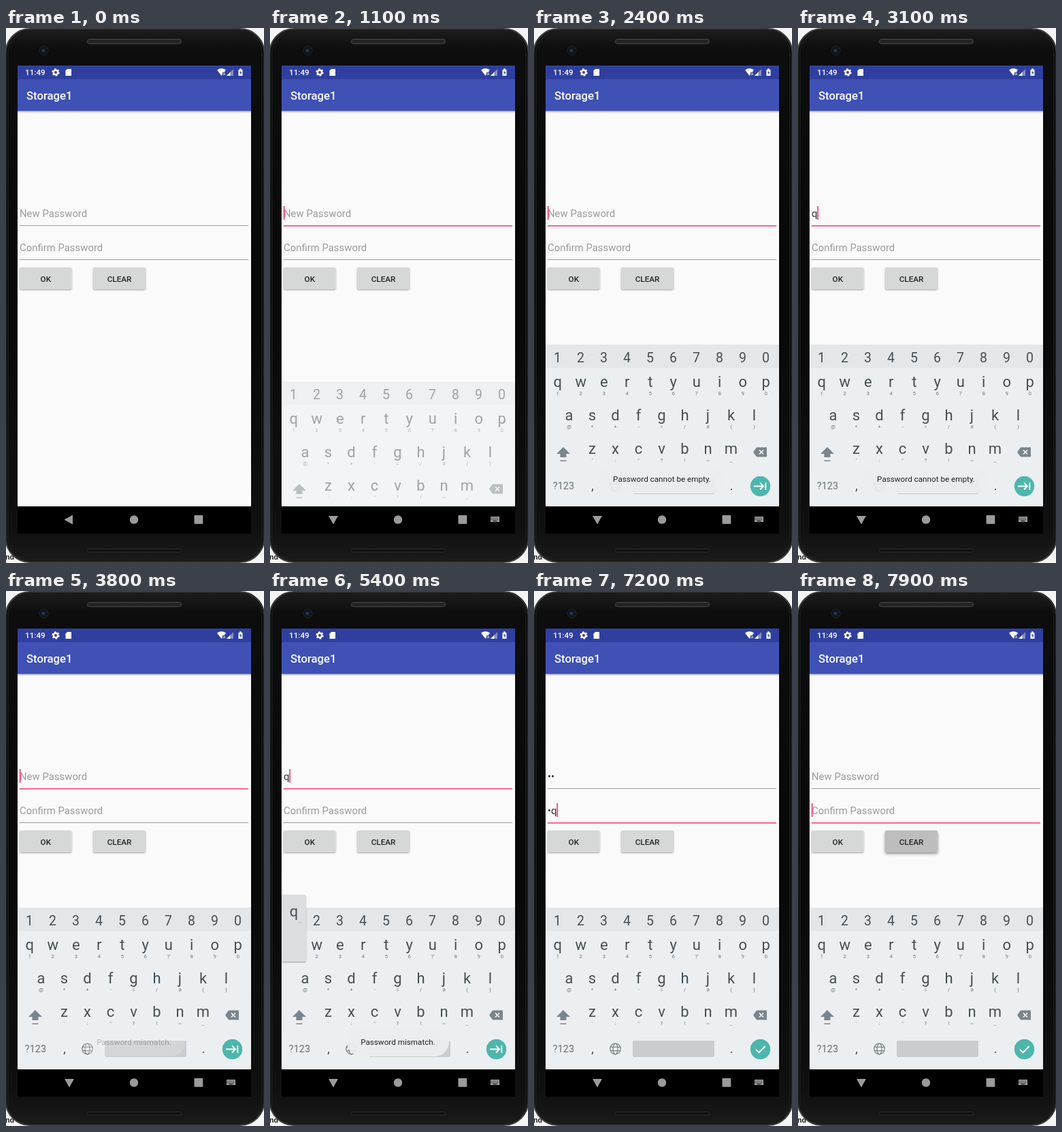
Animation of 379 by 784 pixels, one loop 8000 ms. Source, as an HTML page:

```html
<!DOCTYPE html>
<html lang="en">
<head>
<meta charset="utf-8">
<style>
  html, body { margin: 0; width: 100%; height: 100%; overflow: hidden; background: #f5f5f5; }
  svg { display: block; width: 100vw; height: 100vh; }
  text { font-family: Roboto, sans-serif; white-space: pre; }
  .mid { text-anchor: middle; }
  .medium { font-weight: 500; }
  .field { font-size: 14.9px; }
  .button { font-size: 11.7px; fill: #222; }
  .letter { font-size: 22px; fill: #455058; }
  .digit { font-size: 19.5px; fill: #455058; }
  .sub { font-size: 8px; fill: #717c82; }
  .toast { font-size: 11.7px; fill: #222; }
</style>
</head>
<body>
<svg viewBox="0 0 379 784">
  <defs>
    <linearGradient id="bezel" x2="0" y2="1">
      <stop offset="0" stop-color="#1d1d1d"/><stop offset=".04" stop-color="#0d0d0d"/>
      <stop offset=".5" stop-color="#080808"/><stop offset=".94" stop-color="#101010"/>
      <stop offset="1" stop-color="#1b1b1b"/>
    </linearGradient>
    <linearGradient id="barShadow" x2="0" y2="1">
      <stop offset="0" stop-opacity=".3"/><stop offset="1" stop-opacity="0"/>
    </linearGradient>
    <filter id="shadow" x="-20%" y="-20%" width="140%" height="150%">
      <feDropShadow dx="0" dy="1" stdDeviation="1" flood-opacity=".35"/>
    </filter>
    <filter id="lifted" x="-20%" y="-20%" width="140%" height="160%">
      <feDropShadow dx="0" dy="2" stdDeviation="2" flood-opacity=".45"/>
    </filter>
    <clipPath id="screen"><rect x="17" y="55" width="343" height="646"/></clipPath>
    <clipPath id="okClip"><rect x="20" y="351" width="76.5" height="32" rx="2"/></clipPath>
  </defs>

  <!-- phone body -->
  <text x="-1" y="779" style="font:bold 11px 'Liberation Mono',monospace" fill="#222">nd</text>
  <rect x="-.5" y="1" width="380" height="782" rx="36" fill="url(#bezel)" stroke="#3c3c3c" stroke-width="2"/>
  <rect x="3" y="5" width="373" height="774" rx="32" fill="none" stroke="#1c1c1c" stroke-width="1.5"/>
  <rect x="119.500" y="16.500" width="138" height="6.500" rx="3" fill="#242424" stroke="#4a4a4a"/>
  <rect x="119.500" y="763.500" width="138" height="4.500" rx="2" fill="#111" stroke="#2c2c2c"/>
  <circle cx="55.500" cy="33" r="6.500" fill="#11131a" stroke="#25272b"/>
  <circle cx="55" cy="33" r="2.500" fill="#263457"/>

  <!-- app -->
  <rect x="17" y="55" width="343" height="686"/>
  <rect x="17" y="55" width="343" height="646" fill="#fafafa"/>
  <rect x="17" y="121" width="343" height="4" fill="url(#barShadow)"/>
  <rect x="17" y="75" width="343" height="46.500" fill="#3f51b5"/>
  <rect x="17" y="55" width="343" height="20" fill="#303f9f"/>
  <g fill="#fff">
    <text class="medium" x="28" y="69" font-size="11.7">11:49</text>
    <circle cx="73" cy="65" r="3.200" fill="none" stroke="#fff" stroke-width="2.500"/>
    <circle cx="73" cy="65" r="4.900" fill="none" stroke="#fff" stroke-width="1.500" stroke-dasharray="2.500 2.630"/>
    <path d="M90 60h6v10h-8.500v-7.500z"/>
    <path d="M310 61.500q6.500-4.500 13 0l-2.500 3.500h-2.500v3l-1.500 2z"/>
    <path d="M319 66l3 3m0-3l-3 3" stroke="#fff"/>
    <path d="M334 60v10h-10z" opacity=".4"/><path d="M329.500 64.500v5.500h-5.500z"/>
    <path d="M341.500 61h1.500v-1.500h3V61h1.500v9h-6z"/>
    <path d="M345 62.500l-2 3.500h1.500v2.500l2-3.500H345z" fill="#303f9f"/>
    <text class="medium" x="30" y="104.500" font-size="16.700">Storage1</text>
  </g>

  <g id="fields"></g>

  <rect x="20" y="351" width="76.500" height="32" rx="2" fill="#d6d7d7" id="ok"/>
  <circle id="ripple" cx="61" cy="370" fill="#c2c2c2" clip-path="url(#okClip)"/>
  <text class="button medium mid" x="58.300" y="371.700">OK</text>
  <rect x="128" y="351" width="77" height="32" rx="2" id="clear"/>
  <text class="button medium mid" x="166.500" y="371.700">CLEAR</text>

  <!-- keyboard -->
  <g clip-path="url(#screen)">
    <g id="keyboard">
      <rect x="17" y="464" width="343" height="260" fill="#eceff1"/>
      <rect x="17" y="464" width="343" height="34" fill="#e4e7e9"/>
      <g id="keys"></g>
      <path d="M43 614l10 10h-5.500v5h-9v-5H33zM38.500 633.500h9v1.500h-9z" fill="#7b868c"/>
      <path d="M322 621.500l5-7h15v14h-15z" fill="#7b868c"/>
      <path d="M331 618.500l6 6m0-6l-6 6" stroke="#fff" stroke-width="1.500"/>
      <text class="mid" x="43.500" y="676" font-size="14.500" fill="#65737a">?123</text>
      <text class="letter mid" x="86" y="677" style="font-size:18px">,</text>
      <text class="letter mid" x="290" y="677" style="font-size:18px">.</text>
      <g fill="none" stroke="#7b868c" stroke-width="1.300">
        <circle cx="119.500" cy="671" r="7.800"/><ellipse cx="119.500" cy="671" rx="3.500" ry="7.800"/>
        <path d="M112.500 668.300h14m-14 5.400h14"/>
      </g>
      <rect x="145" y="659" width="120" height="24" rx="2" fill="#c9cdcf"/>
      <circle cx="332.500" cy="671.500" r="14.700" fill="#4db6ac"/>
      <path id="enter" fill="none" stroke="#fff" stroke-width="1.900"/>
    </g>
    <g id="popup">
      <rect x="17" y="445" width="35.500" height="98" rx="2" fill="#dcdfe0" filter="url(#shadow)"/>
      <text class="letter mid" x="35" y="477">q</text>
      <text class="sub mid" x="44" y="486">…</text>
    </g>
    <g id="toasts"></g>
  </g>

  <!-- navigation bar -->
  <g fill="#9b9b9b">
    <path id="back"/>
    <circle cx="188" cy="720.500" r="6.200"/>
    <rect x="276.500" y="714" width="12.800" height="12.800" rx="1"/>
    <g id="imeIcon">
      <path d="M324 716h13v8h-13z"/>
      <path d="M325 718.300h11m-11 2.200h11" stroke="#000" stroke-dasharray="1 1.200"/>
      <path d="M327.500 722.600h6" stroke="#000"/>
    </g>
  </g>
</svg>
<script>
const LOOP = 8000;
const $ = id => document.getElementById(id);
const set = (el, attrs) => { for (const k in attrs) el.setAttribute(k, attrs[k]); };
const show = (el, on) => { el.style.display = on ? '' : 'none'; };
const ramp = (t, a, b) => Math.min(1, Math.max(0, (t - a) / (b - a)));
const within = (t, spans) => spans.some(([a, b]) => t >= a && t < b);
const valueAt = (t, steps) => steps.filter(([start]) => start <= t).pop()[1];
const escapeText = s => s.replace('&', '&amp;').replace('<', '&lt;');
const label = (cls, x, y, s) => `<text class="${cls} mid" x="${x}" y="${y}">${escapeText(s)}</text>`;

// Rows: class, first key centre, baseline, labels, small labels
const rows = [
  ['digit', 34.5, 490, '1234567890', ''],
  ['letter', 34.8, 526, 'qwertyuiop', '1234567890'],
  ['letter', 51.5, 575, 'asdfghjkl', '@*+-=/#()'],
  ['letter', 85.5, 624, 'zxcvbnm', '\':"?!~_']
];
$('keys').innerHTML = rows.map(([cls, x, y, main, small]) =>
  [...main].map((c, i) => label(cls, x + i * 34, y, c) +
    (small ? label('sub', x + i * 34, y + 12, small[i]) : '')).join('')).join('');

const fields = [
  { hint: 'New Password', y: 277, text: [[0, ''], [2800, 'q'], [3700, ''], [5400, 'q'], [5600, '•q'], [6100, '••'], [7900, '']] },
  { hint: 'Confirm Password', y: 327, text: [[0, ''], [6900, 'q'], [7100, '•q'], [7900, '']] }
];
$('fields').innerHTML = fields.map(f => `<g><text class="field" x="20" y="${f.y}"></text>
  <rect x="20" width="336"/><rect y="${f.y - 16}" width="1.800" height="20" fill="#ff4081"/></g>`).join('');
fields.forEach((f, i) => [f.input, f.line, f.cursor] = $('fields').children[i].children);

const toasts = [
  { text: 'Password cannot be empty.', x: 96, width: 184, alpha: t => ramp(t, 1500, 2100) - ramp(t, 3300, 3700) },
  { text: 'Password mismatch.', x: 113, width: 150, alpha: t => ramp(t, 3650, 4200) - ramp(t, 5400, 5700) }
];
$('toasts').innerHTML = toasts.map(o => `<g><rect x="${o.x}" y="640" width="${o.width}" height="42" rx="21"
  fill="#ebeeef" fill-opacity=".94"/>${label('toast', 188, 664.5, o.text)}</g>`).join('');

const cursorOn = [[900, 1300], [1400, 1900], [2400, 3400], [3700, 4400], [4900, 6500], [6900, 7500], [7900, 8000]];
const popupOn = [[2800, 3100], [5400, 5500], [5600, 5700], [6900, 7000], [7100, 7200]];
const okPresses = [1200, 3500];

function draw(t) {
  const focus = t < 900 ? -1 : t < 6000 ? 0 : 1;
  fields.forEach((f, i) => {
    const text = valueAt(t, f.text), focused = i === focus;
    f.input.textContent = text || f.hint;
    set(f.input, { fill: text ? '#333' : '#9b9b9b' });
    set(f.line, { y: f.y + 12, height: focused ? 1.8 : 1, fill: focused ? '#f5588a' : '#9c9c9c' });
    set(f.cursor, { x: 19.8 + (text ? f.input.getComputedTextLength() : 0) });
    show(f.cursor, focused && within(t, cursorOn));
  });

  const press = okPresses.find(p => t >= p && t < p + 300);
  show($('ripple'), press !== undefined);
  if (press !== undefined) set($('ripple'), { r: 12 + (t - press) * 0.14 });
  set($('ok'), { filter: press !== undefined ? 'url(#lifted)' : 'url(#shadow)' });
  const clearing = t >= 7900;
  set($('clear'), { fill: clearing ? '#bdbdbd' : '#d6d7d7', filter: clearing ? 'url(#lifted)' : 'url(#shadow)' });

  const open = t >= 1100;
  show($('keyboard'), open);
  show($('imeIcon'), open);
  const slide = 1 - ramp(t, 1000, 1400);
  set($('keyboard'), { transform: `translate(0 ${128 * slide ** 3})`, opacity: ramp(t, 950, 1250) });
  set($('enter'), { d: focus === 1 ? 'M326 672l4.500 4.500 9-9.500' : 'M323 671.500h14m-5-5l5 5-5 5m8.300-10.500v11' });
  set($('back'), { d: open ? 'M86 715h14l-7 12.500z' : 'M85.500 720.500l12.500-7v14z' });

  show($('popup'), within(t, popupOn));
  toasts.forEach((o, i) => set($('toasts').children[i], { opacity: o.alpha(t) }));
}

const start = performance.now();
function tick() {
  const t = (performance.now() - start) % LOOP;
  draw(Math.floor(t / 100) * 100);
  requestAnimationFrame(tick);
}
tick();
</script>
</body>
</html>
```
